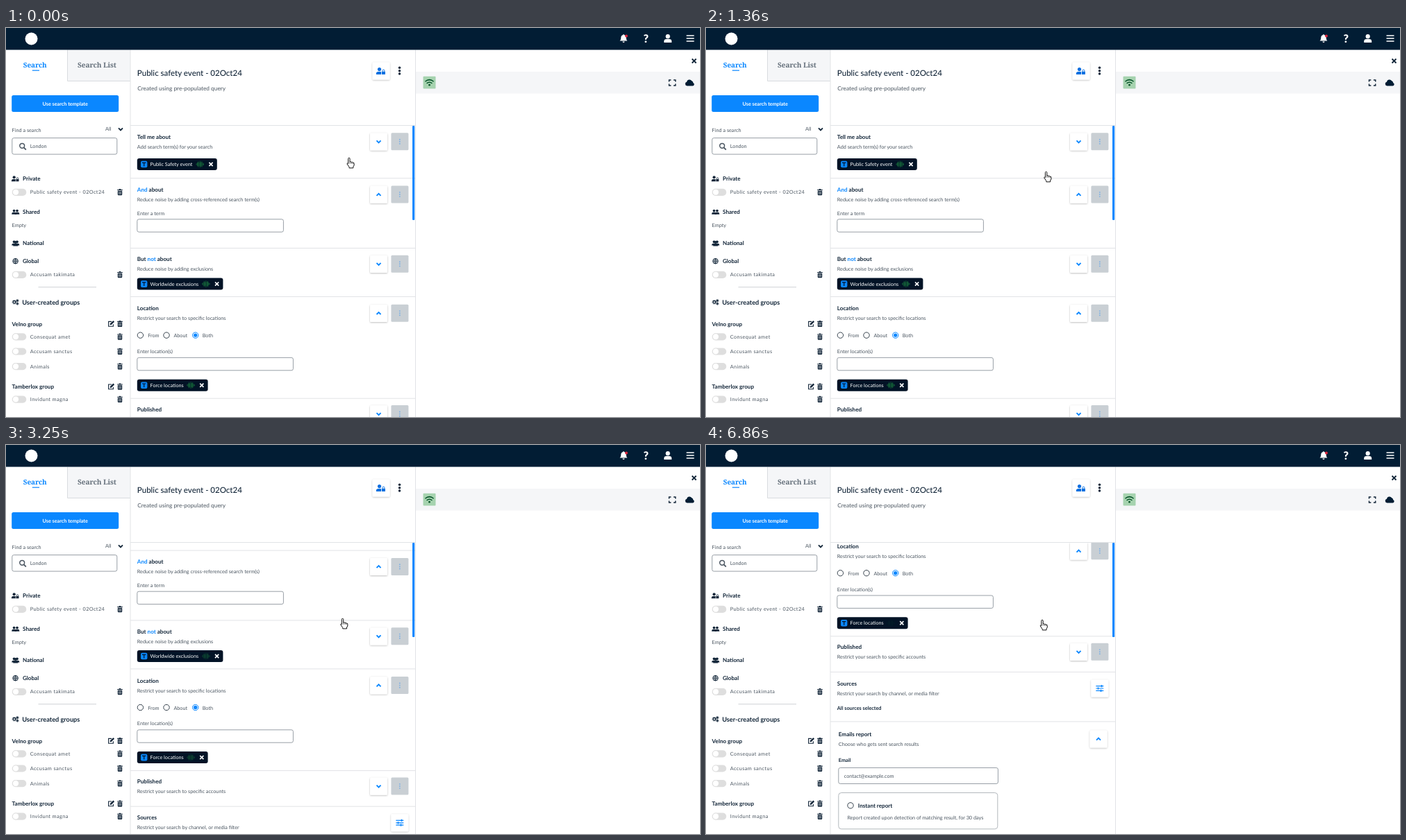
Recreate the animation shown at these times as an HTML page. Size 999 by 561 pixels, loop 8000 ms.

```html
<!DOCTYPE html>
<html lang="en">
<head>
<meta charset="utf-8">
<title>Search editor</title>
<style>
html, body { margin: 0; width: 100%; height: 100%; overflow: hidden; background: #fff; }
svg { display: block; width: 999px; height: 561px; }
text { font-family: Lato, sans-serif; text-rendering: geometricPrecision; white-space: pre; }
.tab { font-family: "Noto Serif", serif; font-weight: 600; letter-spacing: -.15px; }
</style>
</head>
<body>
<svg id="stage" viewBox="0 0 999 561" xmlns="http://www.w3.org/2000/svg"></svg>
<script>
const NAVY = '#021d34', INK = '#14273a', GREY = '#4b5661', BLUE = '#0a87ff', LINE = '#e1e3e6';

// Basic shapes
const rect = (x, y, w, h, fill, r = 0, extra = '') =>
  `<rect x="${x}" y="${y}" width="${w}" height="${h}" fill="${fill}" rx="${r}" ${extra}/>`;
const path = (d, fill = 'none', stroke = 'none', width = 1, extra = '') =>
  `<path d="${d}" fill="${fill}" stroke="${stroke}" stroke-width="${width}" ${extra}/>`;
const dot = (x, y, r, fill, extra = '') => `<circle cx="${x}" cy="${y}" r="${r}" fill="${fill}" ${extra}/>`;
const at = (x, y, body, scale = 1) => `<g transform="translate(${x} ${y}) scale(${scale})">${body}</g>`;

// Text is placed by its left edge and the middle of its capitals
const text = (x, y, s, size = 7.28, fill = GREY, extra = '') =>
  `<text x="${x}" y="${y + size * .36}" font-size="${size}" fill="${fill}" ${extra}>${s}</text>`;
const bold = (x, y, s, size = 8.1, fill = INK) => text(x, y, s, size, fill, 'font-weight="700"');
const spaced = (x, y, s) => text(x, y, s, 7.28, GREY, 'letter-spacing=".42"');
const blue = s => `<tspan fill="${BLUE}">${s}</tspan>`;

// Icons
const chevron = (x, y, up, color = BLUE) =>
  at(x, y, path(up ? 'M-3 1.6L0-1.4L3 1.6' : 'M-3-1.6L0 1.4L3-1.6', 'none', color, 1.9));
const cross = (x, y, r, color, width = 1.7) =>
  at(x, y, path(`M${-r} ${-r}L${r} ${r}M${r} ${-r}L${-r} ${r}`, 'none', color, width));
const kebab = (x, y, gap, r, color) => [-gap, 0, gap].map(d => dot(x, y + d, r, color)).join('');
const trash = (x, y) => at(x, y,
  path('M-3.8-3.8h2.2l.6-.9h2l.6.9h2.2v1.1h-7.6zM-3.2-2h6.4v5.3q0 1.2-1.1 1.2h-4.2q-1.1 0-1.1-1.2z', INK) +
  path('M-1.4-.8v4M0-.8v4M1.4-.8v4', 'none', '#fff', .55));
const edit = (x, y) => at(x, y,
  path('M1-3.2h-4.4v6.8h6.8v-3', 'none', INK, 1.1) + path('M-1.4 1.7l.3-2L3.4-4.6l1.7 1.7L.6 1.5z', INK));
const person = (x, y, scale, color) => at(x, y,
  dot(0, -2.6, 2.8, color) + path('M-5 5.4v-1.4q0-3 3.2-3h3.6q3.2 0 3.2 3v1.4z', color), scale);
const lock = (x, y, color, scale = 1) => at(x, y,
  rect(-2.4, -.6, 4.8, 4, color, .6) + path('M-1.4-.6v-1.2a1.4 1.4 0 0 1 2.8 0v1.2', 'none', color, .9), scale);
const gear = (x, y, r) => dot(x, y, r, 'none', `stroke="${INK}" stroke-width="1.3"`) +
  dot(x, y, r + 1, 'none', `stroke="${INK}" stroke-width=".9" stroke-dasharray="1 1"`);
const personLock = (x, y, scale, color) => person(x - 2 * scale, y, scale * .88, color) +
  rect(x + .4 * scale, y - .4 * scale, 6 * scale, 5.6 * scale, '#fff') + lock(x + 3.6 * scale, y + 1.4 * scale, color, scale);

// Controls
const toggle = y => rect(8.7, y - 5, 20.6, 10.2, '#dedede', 5.1) + dot(14, y, 4.5, '#fff', 'stroke="#d2d2d2" stroke-width=".5"');
const field = (x, y, w, h) => rect(x, y, w, h, '#fff', 2.5, 'stroke="#8d959c" stroke-width=".9"');
const button = (x, y, body) => rect(x - 12.5, y - 12.5, 25, 25, '#fff', 1.5, 'filter="url(#lift)"') + body;
const expander = (y, up, x = 536.5) => button(x, y, chevron(x, y, up));
const tools = (y, up) => expander(y, up) + rect(554.4, y - 12.7, 25, 25, '#c9cfd4', 1.5) + kebab(566.8, y - .2, 3.1, .95, '#7eb1e4');
const divider = y => rect(179, y - .5, 410, 1, LINE);
const radio = (x, y, on) => dot(x, y, 4.2, '#fff', `stroke="${on ? BLUE : '#36424d'}" stroke-width="1"`) + (on ? dot(x, y, 2.7, BLUE) : '');
const wave = (x, y) => {
  const bars = [1, 2.4, 4, 2.6, 4.7, 3, 4, 2, 1];
  return `<g class="wave">${path(bars.map((h, i) => `M${x - 5.2 + i * 1.3} ${y - h}v${2 * h}`).join(''), 'none', '#1c8140', .75)}</g>`;
};
const chip = (y, w, label) => rect(188.8, y - 8.5, w, 17, '#021326', 3) +
  rect(194, y - 4.8, 9.4, 9.6, BLUE, 2) + path(`M196 ${y - 2.2}h5.4M198.7 ${y - 2.2}v5.2`, 'none', '#021326', 1.2) +
  text(207.6, y, label, 7.28, '#fff') + wave(188.8 + w - 24.5, y) + cross(188.8 + w - 8.8, y, 2.6, '#fff');
const section = (y, title, note, x = 188.8) => bold(x, y, title) + text(x, y + 14.4, note);

const topBar = () => rect(0, 0, 999, 31.5, NAVY) + dot(36.5, 15.5, 9, '#fff') +
  at(889, 15, path('M-5.4 3.6q1.6-1.4 1.6-4.2q0-3.6 3-4.3v-.9h1.6v.9q3 .7 3 4.3q0 2.8 1.6 4.2zM-1.6 4.4h3.2q-.2 1.5-1.6 1.5t-1.6-1.5z', '#fff')) +
  dot(893, 11.4, 2, '#d9273c') +
  text(921.3, 15.2, '?', 16, '#fff', 'font-weight="900" text-anchor="middle"') +
  person(952.7, 15, 1.1, '#fff') +
  path('M979.5 11h11M979.5 15h11M979.5 19h11', 'none', '#fff', 1.6);

const groupIcon = (y, extra) => person(11.6, y, .66, INK) + person(16, y, .66, INK) +
  (extra ? person(13.8, y + .8, .7, INK) : '');

const sidebar = () => {
  const heading = (y, s) => bold(24, y, s);
  const item = (y, s) => toggle(y) + spaced(34.8, y, s) + trash(164, y);
  const group = (y, s) => bold(8.6, y, s) + edit(151, y) + trash(164, y);
  return rect(88.5, 31.5, 90.5, 45, '#f5f6f8') + path('M88.5 31.5V76.5H179', 'none', '#d9dcdf') +
    text(24.8, 53.6, 'Search', 10, BLUE, 'class="tab"') + rect(37.8, 60.6, 10.2, 1.2, BLUE) +
    text(103, 53.6, 'Search List', 10.2, '#66717c', 'class="tab"') +
    rect(8.2, 97, 154, 24, BLUE, 2.5) +
    text(85.2, 109, 'Use search template', 7.25, '#fff', 'font-weight="700" text-anchor="middle"') +
    text(8.6, 147, 'Find a search') + text(143, 145.8, 'All') + chevron(165, 146, false, INK) +
    field(8.8, 158.6, 151, 23.5) +
    dot(23.2, 169.8, 3.4, 'none', `stroke="${GREY}" stroke-width="1.5"`) +
    path('M25.7 172.4l3.1 3.2', 'none', GREY, 1.8) + text(34.8, 170.5, 'London') +
    personLock(13.4, 217.2, .85, INK) + heading(217.2, 'Private') + item(236.8, 'Public safety event - 02Oct24') +
    groupIcon(265.2) + heading(265.2, 'Shared') + text(8.6, 284.6, 'Empty') +
    groupIcon(310, true) + heading(310, 'National') +
    dot(13.6, 336.2, 3.8, 'none', `stroke="${INK}" stroke-width="1"`) +
    path('M9.8 336.2h7.6M13.6 332.4v7.6M13.6 332.4q-3.6 3.8 0 7.6q3.6-3.8 0-7.6', 'none', INK, .8) +
    heading(336.2, 'Global') + item(355.8, 'Accusam takimata') +
    rect(46.5, 373.2, 83.5, 1, '#cfd3d6') +
    gear(11.9, 395.3, 1.8) + gear(16.4, 393.2, .8) + gear(16.4, 397.6, .8) +
    bold(23.2, 395.6, 'User-created groups', 9.2) +
    group(426.6, 'Velno group') + item(445.2, 'Consequat amet') + item(466.4, 'Accusam sanctus') + item(488, 'Animals') +
    group(517.2, 'Tamberlox group') + item(535.5, 'Invidunt magna') +
    rect(178.5, 31.5, 1, 529.5, LINE);
};

const editorHead = () =>
  text(188.8, 64.8, 'Public safety event - 02Oct24', 11.5, INK, 'font-weight="500"') +
  text(189.2, 87, 'Created using pre-populated query', 8.3) +
  button(540, 62, personLock(539.6, 62, 1.05, '#0b6fe0')) + kebab(566.5, 61.7, 4.4, 1.75, INK) + divider(140.5);

const sections = () =>
  section(156.7, 'Tell me about', 'Add search term(s) for your search') + tools(164, false) +
  chip(196.5, 115, 'Public Safety event') + divider(216.7) +

  section(233, blue('And') + ' about', 'Reduce noise by adding cross-referenced search term(s)') + tools(240.2, true) +
  text(188.8, 266.9, 'Enter a term') + field(188.8, 275.8, 210.6, 18.4) + divider(317.5) +

  section(333.4, 'But ' + blue('not') + ' about', 'Reduce noise by adding exclusions') + tools(340.5, false) +
  chip(369.1, 123.6, 'Worldwide exclusions') + divider(387.5) +

  section(404.4, 'Location', 'Restrict your search to specific locations') + tools(411.4, true) +
  radio(193.4, 443.1) + text(204.2, 443.7, 'From') + radio(231, 443.1) + text(241.4, 443.7, 'About') +
  radio(272.7, 443.1, true) + text(282.7, 443.7, 'Both') +
  text(188.8, 466.4, 'Enter location(s)') + field(188.8, 475.4, 224.6, 18.4) +
  chip(515.2, 101.8, 'Force locations') + divider(534.2) +

  section(549.7, 'Published', 'Restrict your search to specific accounts') + tools(556.8, false) + divider(585.8) +

  section(602, 'Sources', 'Restrict your search by channel, or media filter') +
  button(566.8, 609.4, path('M561.3 606h11M561.3 609.4h11M561.3 612.8h11', 'none', BLUE, 1.2) +
    path('M569.5 604.4v3.2M564.5 607.8v3.2M568.5 611.2v3.2', 'none', BLUE, 1.6)) +
  bold(188.8, 637.3, 'All sources selected', 7.28) + divider(657.3) +

  section(675.2, 'Emails report', 'Choose who gets sent search results', 190.8) + expander(682.4, true, 565) +
  bold(190.8, 712.5, 'Email', 7.28) + field(190.8, 723.9, 229.6, 23) + text(198.8, 735.4, 'contact@example.com') +
  rect(190.8, 759.9, 229, 52.3, '#fff', 4, 'stroke="#b3b8bd" stroke-width="1"') + radio(208, 778.3) +
  bold(218.8, 778.7, 'Instant report') + text(203.4, 795.4, 'Report created upon detection of matching result, for 30 days');

const resultsPane = () => rect(590, 63, 409, 31.5, '#f5f6f8') + cross(990.5, 47.5, 3, INK, 1.8) +
  rect(600.5, 69.8, 18, 17.6, '#a6d3af', 1) +
  path('M603.4 77.2q6.1-5.2 12.2 0M605.6 79.8q3.9-3.2 7.8 0', 'none', '#07542a', 1.5) + dot(609.5, 82.2, 1.4, '#07542a') +
  path('M954.5 77.5v-2.6h2.8M960.9 74.9h2.8v2.6M963.7 80.5v2.6h-2.8M957.3 83.1h-2.8v-2.6', 'none', INK, 1.5) +
  path('M980.4 83.4a2.9 2.9 0 0 1-.5-5.7a3.9 3.9 0 0 1 7.2-1.4a2.9 2.9 0 0 1 2 2.8a2.2 2.2 0 0 1-.6 4.3z', NAVY);

const hand = 'M-3.2 1.2V-6a1.2 1.2 0 0 1 2.4 0v4.5q2-.6 2.3.5q1.8-.4 2.1.6q1.7-.3 1.7 1.2v2.7l-1.3 2v1.9h-5.8v-1.4l-3.2-4.8q.6-1.2 1.8 0z';

document.getElementById('stage').innerHTML = `
  <defs>
    <filter id="lift" x="-30%" y="-30%" width="160%" height="160%">
      <feDropShadow dx="0" dy=".8" stdDeviation="1" flood-color="#000" flood-opacity=".28"/>
    </filter>
    <clipPath id="pane"><rect x="179" y="141" width="410" height="420"/></clipPath>
  </defs>
  ${sidebar()}${editorHead()}${resultsPane()}
  <g clip-path="url(#pane)"><g id="list">${sections()}</g></g>
  ${rect(585, 141, 3.2, 136, BLUE, 1)}${rect(589, 31.5, 1, 529.5, LINE)}${topBar()}
  <g id="cursor">${path(hand, '#fff', '#111', 1, 'stroke-linejoin="round"')}${path('M-.8-1.5v2.8M1.5-1v2.4M3.6-.4v2', 'none', '#111', .7)}</g>`;

const LOOP = 8000;
// Start time, x, y
const cursorSteps = [
  [0, 495.8, 194.5], [500, 495.1, 194.5], [560, 494.5, 194.5],
  [1100, 494, 197], [1170, 493.2, 201.5], [1230, 492.3, 206.5], [1290, 491.7, 210.5], [1360, 491.6, 214.5], [1430, 491.5, 218.5],
  [1710, 490, 227], [1780, 488.5, 237], [1850, 487.6, 244], [1990, 487, 244], [2650, 487, 247],
  [2850, 487, 248], [2910, 487, 249.5], [2980, 487, 251], [3050, 487, 252.5], [3110, 487, 253.6],
  [3180, 487, 254.7], [3250, 486.5, 257.5], [3310, 486, 259.5]
];
// Start time, scroll offset, strength of the sound waves
const scrollSteps = [[0, 0, 1], [1490, 64.6, .6], [3470, 129.2, .35], [5050, 193.8, .9], [6860, 258.4, .1]];

const list = document.getElementById('list'), cursor = document.getElementById('cursor');
const waves = document.querySelectorAll('.wave');
const stepAt = (steps, t) => steps.findLast(s => s[0] <= t);

const start = performance.now();
function draw(now) {
  const t = Math.max(0, now - start) % LOOP;
  const [, x, y] = stepAt(cursorSteps, t);
  const [, offset, strength] = stepAt(scrollSteps, t);
  cursor.setAttribute('transform', `translate(${x} ${y})`);
  list.setAttribute('transform', `translate(0 ${-offset})`);
  waves.forEach(w => w.setAttribute('opacity', strength));
  requestAnimationFrame(draw);
}
draw(start);
</script>
</body>
</html>
```
